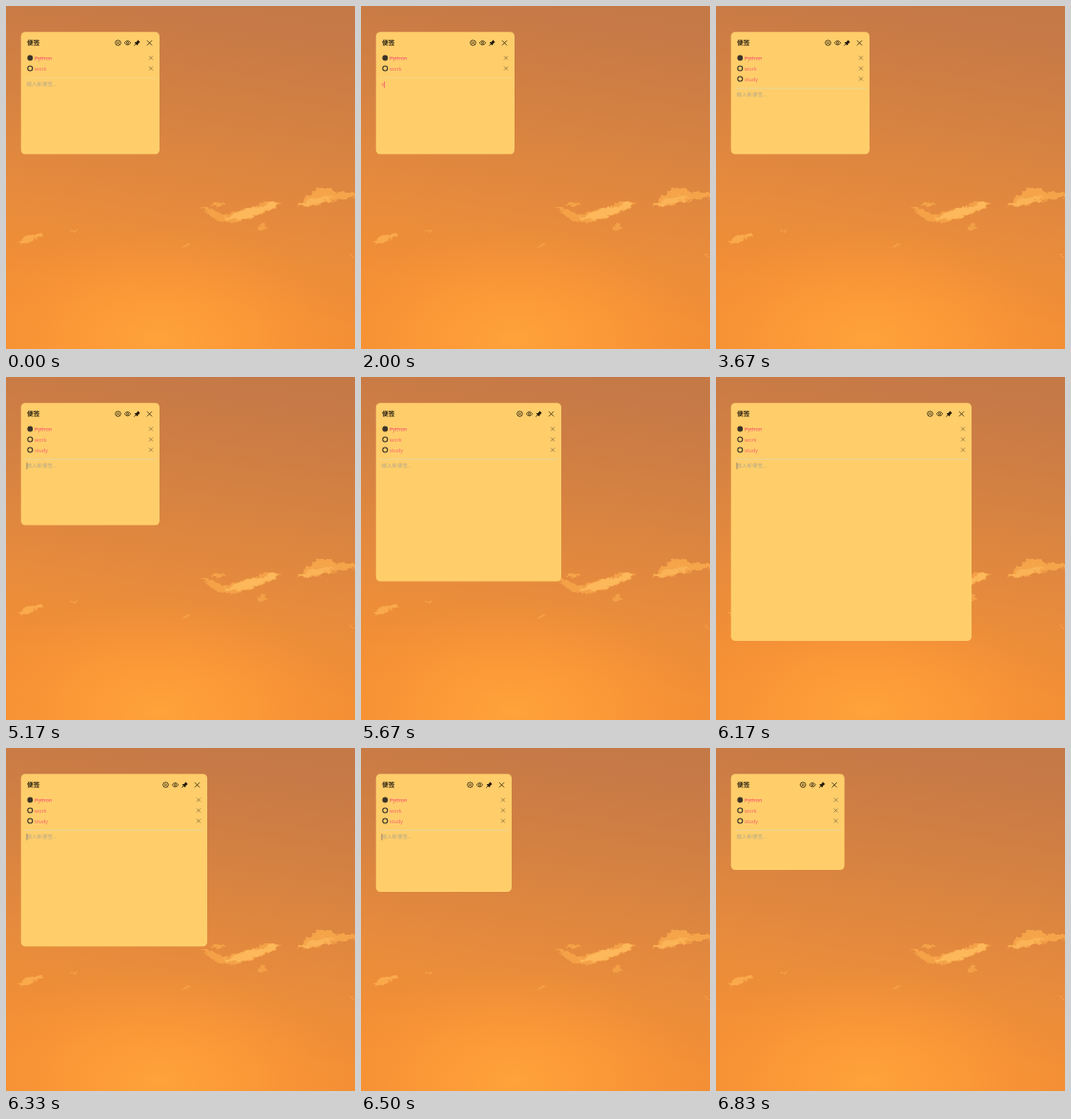
These frames come from a looping animation (366 by 360 pixels, 6990 ms). An HTML page:

```html
<!DOCTYPE html>
<html lang="zh-CN">
<head>
<meta charset="utf-8">
<title>便签</title>
<style>
  html, body { margin: 0; width: 100%; height: 100%; overflow: hidden; background: #e38a3f; }
  svg { display: block; width: 100%; height: 100%; }
  text { font-family: "Open Sans", "Noto Sans CJK SC", "Noto Sans CJK", sans-serif; font-size: 5.5px; text-rendering: geometricPrecision; }
  .title { font-size: 6.7px; font-weight: 700; fill: #2b2312; }
  .item { fill: #f8606a; }
  .hint { fill: #b5a987; }
  .icon { fill: none; stroke: #33290f; stroke-width: .9; }
  .remove { fill: none; stroke: #80683c; stroke-width: .7; }
</style>
</head>
<body>
<svg viewBox="0 0 366 360" preserveAspectRatio="none">
  <defs>
    <linearGradient id="sky" x1=".58" y1="0" x2=".42" y2="1">
      <stop offset="0" stop-color="#c57947"/>
      <stop offset=".3" stop-color="#d48142"/>
      <stop offset=".6" stop-color="#e68b3d"/>
      <stop offset=".85" stop-color="#f38f35"/>
      <stop offset="1" stop-color="#f58f33"/>
    </linearGradient>
    <radialGradient id="glow" gradientUnits="userSpaceOnUse" cx="0" cy="0" r="1" gradientTransform="translate(160 350) scale(210 120)">
      <stop offset="0" stop-color="#ffa33a"/>
      <stop offset=".5" stop-color="#ff9d39" stop-opacity=".6"/>
      <stop offset="1" stop-color="#f99538" stop-opacity="0"/>
    </radialGradient>
    <filter id="wisp" x="-10%" y="-10%" width="120%" height="120%">
      <feTurbulence type="fractalNoise" baseFrequency=".16 .22" numOctaves="3" seed="4"/>
      <feDisplacementMap in="SourceGraphic" scale="7" xChannelSelector="R" yChannelSelector="G"/>
      <feGaussianBlur stdDeviation=".7"/>
    </filter>
  </defs>

  <rect width="366" height="360" fill="url(#sky)"/>
  <rect width="366" height="360" fill="url(#glow)"/>
  <g filter="url(#wisp)" fill="#fcae4f">
    <path d="M205 211L216 213 230 220 242 214 257 211 272 206 288 206 283 212 268 219 255 224 238 228 226 225 214 221Z" opacity=".65"/>
    <path d="M229 223L244 215 262 211 279 207 286 208 277 213 262 220 246 225Z" fill="#ffbd60" opacity=".8"/>
    <path d="M215 208L223 206 231 209 222 211Z" opacity=".7"/>
    <path d="M305 210L314 202 324 193 333 191 347 195 363 196 366 200 347 203 333 207 321 211Z" opacity=".75"/>
    <path d="M307 209L320 202 336 199 345 201 332 206 318 210Z" fill="#ffbd60" opacity=".6"/>
    <path d="M263 232L271 228 273 233 266 236Z" opacity=".6"/>
    <path d="M13 247L22 241 37 238 39 241 28 246 16 249Z" opacity=".85"/>
    <path d="M67 235L73 234 74 237 69 237ZM185 251L194 250 193 254 187 253ZM359 261L365 261 365 264Z" opacity=".5"/>
  </g>

  <rect id="panel" x="15.7" y="27.2" rx="4.6" fill="#ffce6b"/>
  <text class="title" x="22" y="41.2">便签</text>

  <g id="tools">
    <g class="icon">
      <path d="M-43.5 35.9L-42.4 36.4 -41.3 36.7 -41 37.8 -40.6 38.8 -41.2 39.8 -41.6 40.9 -42.6 41 -43.5 41.5 -44.4 41 -45.4 40.9 -45.8 39.8 -46.4 38.8 -46 37.8 -45.7 36.7 -44.6 36.4Z"/>
      <circle cx="-43.5" cy="38.7" r=".9" stroke-width=".7"/>
      <path d="M-36.8 38.7Q-33.5 34.4 -30.2 38.7Q-33.5 43 -36.8 38.7Z" stroke-width=".8"/>
      <circle cx="-33.5" cy="38.7" r="1" stroke-width=".8"/>
      <path d="M-24.2 39.3L-26.6 41.7"/>
      <path d="M-13.1 36.2l5.2 5.2m0-5.2l-5.2 5.2" stroke-width=".8"/>
    </g>
    <path d="M-22.7 35.6L-20.3 38 -21.2 38.4 -22.6 39.8 -22.8 41.1 -23.5 41.2 -26 38.7 -25.9 38 -24.6 37.9 -23.1 36.4Z" fill="#22190a"/>
  </g>

  <circle cx="25.3" cy="54.5" r="2.9" fill="#3a3328"/>
  <g id="rows"></g>
  <path id="strike" d="M30 54.4H48.2" stroke="#f8606a" stroke-width=".6"/>
  <path id="rule" stroke-width=".8"/>
  <text id="entry" x="21.6"></text>
  <path id="caret" stroke-width=".8"/>
</svg>
<script>
  const LOOP = 6990, LEFT = 15.7, TOP = 27.2, ROW = 11;
  const $ = id => document.getElementById(id);
  const set = (el, attrs) => { for (const k in attrs) el.setAttribute(k, attrs[k]); };

  const WORD = "study", ADDED = 3670;
  const keyTimes = [2000, 2170, 2500, 2830, 3000];
  // [time, right edge, bottom edge] while the corner is dragged
  const drags = [
    [0, 161, 155.5], [5670, 210, 214.5], [5830, 232, 243.5], [6000, 266, 277.5],
    [6170, 268, 277], [6330, 211, 208.3], [6500, 158, 151], [6670, 136, 131], [6830, 134.7, 128]
  ];

  const rows = ["Python", "work", WORD].map((label, i) => {
    const y = 54.5 + i * ROW;
    const ring = i ? `<circle cx="25.3" cy="${y}" r="2.5" fill="none" stroke="#3a3328" stroke-width="1.1"/>` : "";
    $("rows").insertAdjacentHTML("beforeend",
      `<g>${ring}<text class="item" x="30" y="${y + 2}">${label}</text>` +
      `<path class="remove" d="M-11 ${y - 2}l4 4m0-4l-4 4"/></g>`);
    return $("rows").lastElementChild;
  });

  function caretOn(t) {
    if (t < ADDED) return t >= 1170 && t < 1670 || t >= 2000 && t < 3170;
    return Math.floor((t - ADDED) / 500) % 2 === 1;
  }

  function draw(t) {
    const [, right, bottom] = drags.filter(d => d[0] <= t).pop();
    const added = t >= ADDED;
    const typed = added ? "" : WORD.slice(0, keyTimes.filter(k => k <= t).length);
    const ruleY = added ? 86.3 : 75.4;
    const shift = `translate(${right})`;

    set($("panel"), { width: right - LEFT, height: bottom - TOP });
    set($("tools"), { transform: shift });
    rows.forEach(row => set(row.lastElementChild, { transform: shift }));
    rows[2].style.display = added ? "" : "none";
    set($("rule"), { d: `M20 ${ruleY}H${right - 3.5}`, stroke: added ? "#e4d9a5" : "#f6d68a" });

    const entry = $("entry");
    entry.textContent = typed || "输入新便签...";
    set(entry, { y: ruleY + 9, class: typed ? "item" : "hint" });
    const x = 21.9 + (typed ? entry.getComputedTextLength() : 0);
    set($("caret"), {
      d: `M${x} ${ruleY + 3.6}v7`,
      stroke: typed ? "#f0626a" : "#8c7a66",
      visibility: caretOn(t) ? "visible" : "hidden"
    });
  }

  function tick() {
    draw(performance.now() % LOOP);
    requestAnimationFrame(tick);
  }
  tick();
</script>
</body>
</html>
```
